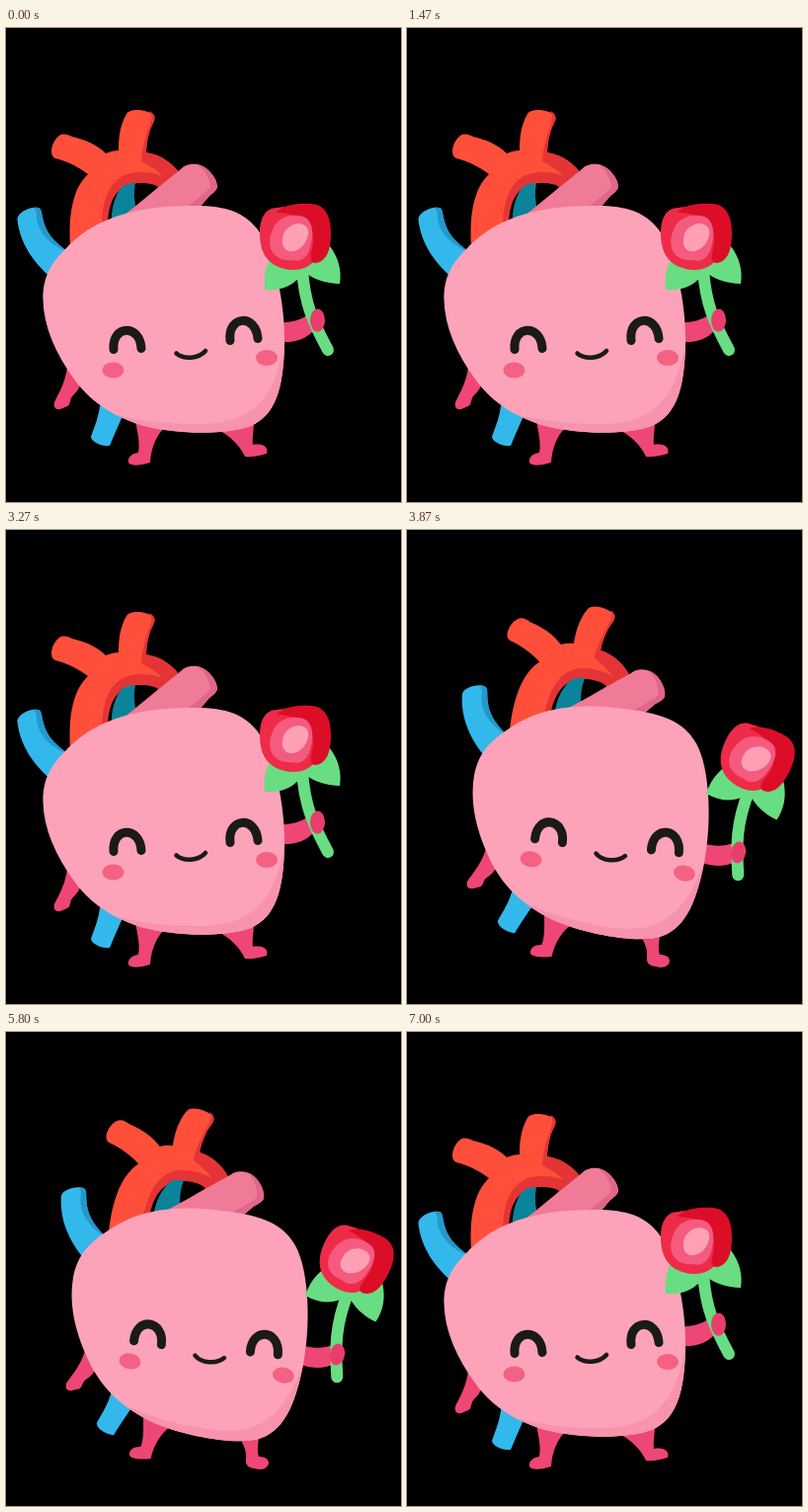
Write an HTML page that moves like this. It is 400 px wide and 480 px high and loops after 7070 ms.

```html
<!DOCTYPE html>
<html lang="en">
<head>
<meta charset="utf-8">
<title>Dancing heart</title>
<style>
  html, body { margin: 0; width: 100%; height: 100%; overflow: hidden; background: #000; }
  svg { display: block; width: 400px; height: 480px; }
  .limb { fill: #ee4675; }
  .hand { fill: #e93e6d; }
  .leaf { fill: #69dd82; }
  .red { fill: #ff4f3a; }
  .wine { fill: #e53436; }
  .blue { fill: #33b8eb; }
  .navy { fill: #2398cc; }
  .line { fill: none; stroke: #1a1a18; stroke-linecap: round; }
  /* Hard swap between the two poses, on a beat of about half a second */
  #right { animation: sway 7070ms step-end infinite; }
  @keyframes sway {
    0%, 14.144%, 28.289%, 42.433%, 56.577%, 70.721%, 84.866%, 99.01% { visibility: hidden; }
    7.496%, 21.641%, 35.785%, 49.929%, 64.074%, 78.218%, 92.362% { visibility: visible; }
  }
</style>
</head>
<body>
<svg viewBox="0 0 400 480">
  <defs>
    <g id="heart">
      <!-- limbs -->
      <g class="limb">
        <path d="M62 343C60 360 53 370 49 379C48 384 50 387 55 386L62 383C66 381 64 377 67 373C71 369 74 366 77 357Z"/>
        <path d="M131 397C133 410 136 420 134 430C127 431 123 435 124 440C126 444 137 443 146 440C147 425 152 413 160 405Z"/>
      </g>
      <!-- veins -->
      <path class="blue" d="M96 376C94 395 90 402 86 414C87 420 98 424 105 423C109 413 113 404 118 393Z"/>
      <path class="blue" d="M11.500 194C11 187 25 180 33 182C36 183 36 187 37 192C40 207 48 216 62 226L46 253C28 238 14 218 11.500 194Z"/>
      <path class="navy" d="M28 182C34 181 36 184 37 192C40 207 48 216 62 226C44 220 33 207 31 193C31 189 31 185 28 182Z"/>
      <!-- aorta -->
      <path class="red" d="M66 232C61 185 70 160 83 148C74 141 62 135 50 132C43 129 46 115 54 109C58 106 63 108 67 110C80 113 92 118 101 127C106 125 110 124 114 124C114 112 115 99 122 87C126 80 146 83 150 89C152 94 146 100 145 107C143 113 142 119 142 126C159 129 170 138 178 150L150 200L90 215Z"/>
      <path class="wine" d="M145 84C149 86 152 89 150 94C147 100 145 104 144 110C143 116 142 121 142 126C159 129 170 138 178 150L165 160C160 148 150 142 137 135C138 118 143 105 147 94C148 90 147 87 145 84Z"/>
      <path class="wine" d="M97 202C97 167 109 146 136 146C150 146 161 149 168 156L140 190Z"/>
      <path d="M103 200C103 173 114 157 136 157C144 157 150 158 154 161L130 192Z"/>
      <path fill="#0b839a" d="M107 198C106 182 111 168 118 160C122 158 126 157 131 157C129 168 130 175 132 184L115 198Z"/>
      <!-- pulmonary artery -->
      <path fill="#f07b97" d="M114 194C138 175 158 158 177 143C182 137 192 137 197 139C206 142 214 153 214 161C213 165 209 168 206 170L185 195Z"/>
      <path fill="#e0668a" d="M193 138C203 139 214 152 214 161C213 165 209 168 206 170L190 188L177 186C190 176 200 169 207 161C206 151 201 143 193 138Z"/>
      <!-- body -->
      <path fill="#fca3b9" d="M37.500 275C37 252 46 237 62 222C82 202 112 181 185 180C222 179 240 186 254 203C272 226 283 280 282 320C281 365 273 392 248 403C225 412 175 412 140 403C112 395 88 381 70 357C50 330 38 302 37.500 275Z"/>
      <path fill="#f793ac" d="M282 320C281 365 273 392 248 403C225 412 175 412 140 403C129 400 119 395 110 391C135 398 165 401 195 401C255 401 272 370 282 320Z"/>
      <!-- face -->
      <g fill="#f46283">
        <ellipse cx="108.500" cy="346.500" rx="11" ry="8"/>
        <ellipse cx="264" cy="334" rx="11" ry="8"/>
      </g>
      <path class="line" stroke-width="9" d="M109 325.500C107 300 136 300 137 324.500M227 316.500C224 291 253 289 255 314.500"/>
      <path class="line" stroke-width="4.500" d="M172.500 329.500C180 336 195 335 202 327"/>
    </g>
    <g id="rose">
      <path d="M300 243C302 280 312 300 326 326" fill="none" stroke="#69dd82" stroke-width="12" stroke-linecap="round"/>
      <path class="leaf" d="M266 236C261 248 261 258 262 265C278 266 292 262 302 246L300 236Z"/>
      <path class="leaf" d="M328 221C337 233 340 246 338 259C324 259 310 254 301 246L300 236Z"/>
      <path fill="#ee2b48" d="M257 208C257 193 262 182 275 182C287 178 318 190 318 215C318 234 308 245 291 245C270 244 257 233 257 208Z"/>
      <path fill="#dc0e27" d="M274 187C280 179 296 177 309 178C323 179 329 190 329 208C329 226 324 237 313 238C306 237 309 229 311 218C313 201 301 187 274 187Z"/>
      <path fill="#f45b7f" d="M272 200C279 190 291 188 301 191C310 194 312 207 309 218C307 231 300 238 289 235C272 237 260 222 272 200Z"/>
      <path fill="#ffa0b5" d="M280 214C280 205 288 198 297 198C306 199 308 206 305 213C302 222 294 227 287 226C282 225 279 220 280 214Z"/>
    </g>
  </defs>

  <rect width="400" height="480"/>
  <g id="left">
    <g class="limb">
      <path d="M276 298C292 299 300 294 309 289L313 305C303 316 292 319 276 318Z"/>
      <path d="M215 407C227 413 237 423 242 434C246 435 258 433 264 431C266 425 261 420 250 422C249 415 251 408 251 398Z"/>
    </g>
    <use href="#heart"/>
    <use href="#rose"/>
    <ellipse class="hand" cx="315.500" cy="296" rx="7.500" ry="11.500"/>
  </g>
  <g id="right">
    <rect width="400" height="480"/>
    <g class="limb">
      <path d="M298 317C312 321 322 320 331 317L333 336C322 341 312 341 298 337Z"/>
      <path d="M233 406C240 415 244 424 243 433C242 438 246 442 252 442C258 444 264 443 266 437C266 432 262 430 256 430C254 424 255 417 257 406Z"/>
    </g>
    <use href="#heart" transform="translate(205.500 331.500) rotate(9.800) translate(-187 -331)"/>
    <use href="#rose" transform="translate(353.500 232) rotate(25) translate(-293 -212)"/>
    <ellipse class="hand" cx="335.500" cy="326.500" rx="7.500" ry="11" transform="rotate(10 335.500 326.500)"/>
  </g>
</svg>
</body>
</html>
```
